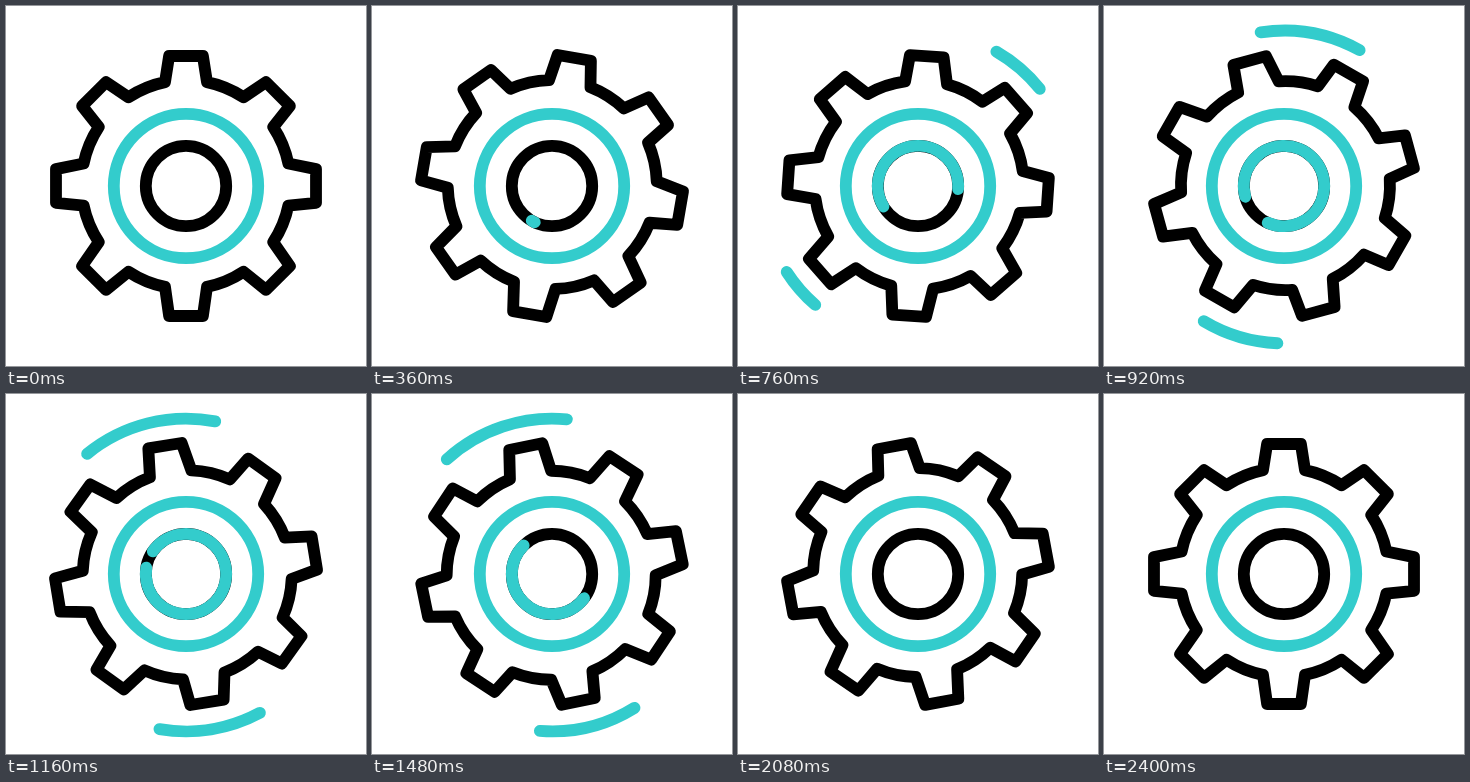
Write an HTML page that moves like this. It is 360 px wide and 360 px high and loops after 2480 ms.

```html
<!DOCTYPE html>
<html lang="en">
<head>
<meta charset="utf-8">
<title>Turning gear</title>
<style>
  html, body { margin: 0; width: 100%; height: 100%; overflow: hidden; background: #fff; }
  svg { display: block; width: 100vw; height: 100vh; }
  svg * { fill: none; stroke-width: 11.8; stroke-linecap: round; stroke-linejoin: round; }
  .ink { stroke: #000; }
  .accent { stroke: #33cccc; }
</style>
</head>
<body>
<svg viewBox="0 0 360 360">
  <path id="gear" class="ink"/>
  <circle class="accent" cx="180" cy="180" r="72.2"/>
  <circle class="ink" cx="180" cy="180" r="40.2"/>
  <path id="hub" class="accent"/>
  <path id="right" class="accent"/>
  <path id="left" class="accent"/>
</svg>
<script>
const LOOP = 2480, STEP = 40;
const $ = id => document.getElementById(id);

// Progress 0..1 between two times
const span = (t, from, to) => Math.min(1, Math.max(0, (t - from) / (to - from)));
const smooth = x => x * x * (3 - 2 * x);

// cubic-bezier(x1, 0, x2, 1)
function bezier(x, x1, x2) {
  let lo = 0, hi = 1;
  for (let i = 0; i < 24; i++) {
    const s = (lo + hi) / 2, r = 1 - s;
    if (3 * s * r * r * x1 + 3 * s * s * r * x2 + s ** 3 < x) lo = s;
    else hi = s;
  }
  return smooth(lo);
}

// Angles run clockwise from twelve o'clock
function point(angle, r, cy = 180) {
  const a = angle * Math.PI / 180;
  return `${(180 + r * Math.sin(a)).toFixed(2)} ${(cy - r * Math.cos(a)).toFixed(2)}`;
}

function drawArc(el, from, to, r, cy) {
  const length = Math.min(to - from, 359.5);
  el.style.display = length > 2 ? "" : "none";
  el.setAttribute("d", `M${point(from, r, cy)}A${r} ${r} 0 ${+(length > 180)} 1 `
    + point(from + length, r, cy));
}

function gearPath() {
  const root = 104.5, tip = 131.1, rootY = 178.5;
  const arc = `A${root} ${root} 0 0 1 `;
  let d = "";
  for (let a = 0; a < 360; a += 45) {
    d += (a ? arc : "M") + point(a - 11.6, root, rootY)
      + `L${point(a - 7.4, tip)}L${point(a + 7.4, tip)}L${point(a + 11.6, root, rootY)}`;
  }
  return d + arc + point(-11.6, root, rootY) + "Z";
}

function draw(t) {
  const s = t / 1000;

  const turn = 360 * bezier(span(t, 0, 2290), 0.574, 0.682);
  $("gear").setAttribute("transform", `rotate(${turn} 180 180)`);

  // The front edge runs a full circle, then the back edge catches up
  const hub = 180 + 64 * s + 18.5 * s * s;
  drawArc($("hub"), hub + 360 * smooth(span(t, 1000, 1990)),
    hub + 360 * smooth(span(t, 305, 1110)), 40.2, 180);

  // The side arcs swing up and back while they grow and shrink
  const swing = 135.5 - 238 * Math.abs(s - 1.38) ** 2.4;
  const back = smooth(span(t, 1380, 2160)), front = smooth(span(t, 443, 1151));
  const sideArc = (id, base, size) =>
    drawArc($(id), base - swing + size * back, base - swing + size * front, 156.4, 181);
  sideArc("right", 90, 50);
  sideArc("left", 281, 38);
}

$("gear").setAttribute("d", gearPath());
const start = performance.now();
function tick() {
  const t = (performance.now() - start) % LOOP;
  draw(Math.floor(t / STEP) * STEP);
  requestAnimationFrame(tick);
}
tick();
</script>
</body>
</html>
```
